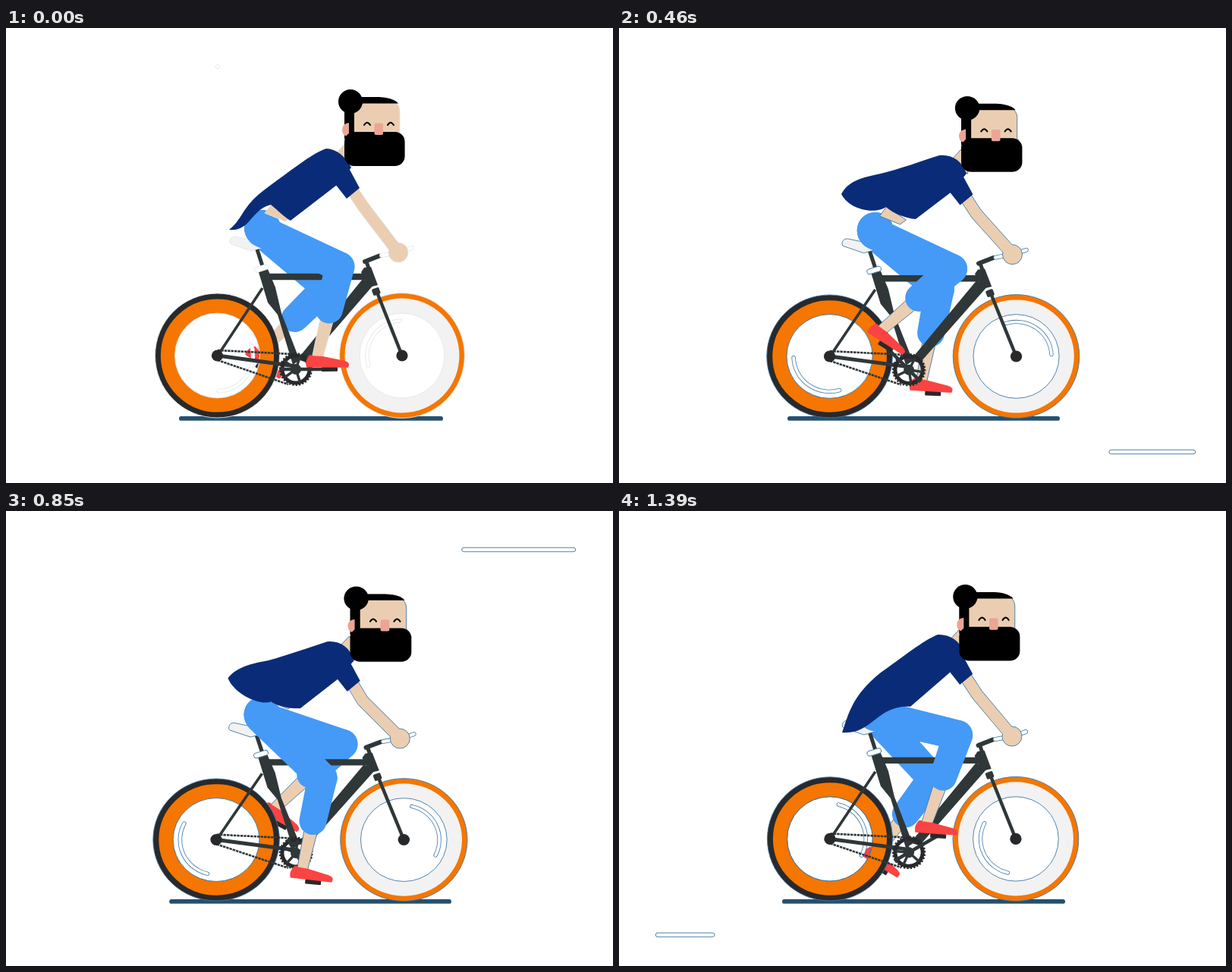
An HTML page that plays this animation: 800 by 600 pixels, repeating every 1.42 s.

```html
<!DOCTYPE html>
<html lang="en">
<head>
<meta charset="utf-8">
<title>Cyclist</title>
<style>
  html, body { margin: 0; width: 100%; height: 100%; overflow: hidden; background: #fff; }
  svg { display: block; width: 100vw; height: 100vh; --edge: #3f78a6; }
  .edge { stroke: var(--edge); stroke-width: .9; }
  .white { fill: #fff; }
  .pale { fill: #f2f2f2; }
  .orange { fill: #f57600; }
  .skin { fill: #ebceb1; }
  .pants { fill: #449af6; }
  .shoe { fill: #fa4343; }
  .shirt { fill: #0a2c78; }
  .dark { fill: #2f3739; }
  .tyre { fill: #28292b; }
  .pink { fill: #eba596; }
  .bar { fill: none; stroke: #2f3739; }
  .line { fill: none; stroke-linecap: round; stroke-linejoin: round; }
</style>
</head>
<body>
<svg viewBox="0 0 800 600">
  <defs>
    <g id="glint" class="line">
      <path d="M29-37A47 47 0 0 1 29 37" stroke="var(--edge)" stroke-width="5.4"/>
      <path d="M29-37A47 47 0 0 1 29 37" stroke="#fff" stroke-width="3.8"/>
    </g>
    <path id="sole" d="M-30-3Q-32-10-28-16Q-26-21-21-18L-8-17L20-11Q27-9 26-5L25-2Z"/>
    <rect id="pedal" x="-10" y="-3" width="21" height="6" rx="1"/>
    <circle id="hub" class="tyre" r="7.6"/>
  </defs>

  <rect id="dash" class="white edge" height="5.4" rx="2.7"/>
  <rect id="ground" y="512" height="5.8" rx="2.9" fill="#24506e"/>

  <g id="farLeg">
    <use href="#pedal" class="tyre"/>
    <path class="skin edge"/><path class="pants"/><path class="pants"/><circle class="pants" r="24"/>
    <use href="#sole" class="shoe"/>
  </g>

  <g id="bike">
    <g transform="translate(278.5 432)">
      <path class="tyre edge" fill-rule="evenodd" d="M-82 0a82 82 0 1 1 164 0a82 82 0 1 1-164 0ZM-56 0a56 56 0 1 0 112 0a56 56 0 1 0-112 0Z"/>
      <circle r="65.3" fill="none" stroke="#f57600" stroke-width="18.6"/>
      <circle id="rearDisc" class="edge" r="56"/>
      <use id="rearGlint" href="#glint"/>
    </g>
    <g transform="translate(522 432)">
      <circle class="orange edge" r="82.4"/>
      <circle class="pale" r="75.5"/>
      <circle class="white edge" r="56"/>
      <use id="frontGlint" href="#glint"/>
    </g>

    <path class="bar" d="M338 343L279 432" stroke-width="3.6"/>
    <path class="bar" d="M279 432L382 446" stroke-width="5"/>
    <path class="bar" d="M279 425L378 430M279 438L372 470" stroke-width="2.6" stroke-dasharray="3.4 1"/>
    <use href="#hub" x="278.5" y="432"/>
    <path class="bar" d="M488 346L522 432" stroke-width="4.4"/>
    <use href="#hub" x="522" y="432"/>
    <path class="bar" d="M345 328H482" stroke-width="8.4"/>
    <path class="dark" d="M333 322L345 318L355 342L363 376L387 438L378 444L358 378L345 362Z"/>
    <path class="dark" d="M470 331L485 338L396 441L384 437Z"/>
    <path class="dark" d="M468 322L472 316L481 315L490 339L478 342Z"/>
    <rect class="dark" x="-5" y="-5" width="10" height="9" rx="2" transform="translate(488 348) rotate(-20)"/>
    <path class="bar" d="M475 308L479 320" stroke-width="5"/>
    <path class="bar line" d="M473 308L492 300.5" stroke-width="6"/>
    <path class="line" d="M495 300L521 295L535 290" stroke="var(--edge)" stroke-width="6"/>
    <path class="line" d="M495 300L521 295L535 290" stroke="#fff" stroke-width="4.4"/>
    <path class="pale edge" d="M295 280Q296 275 302 275L339 283Q342 289 334 291L323 294L297 285Q294 284 295 280Z"/>
    <path class="bar" d="M331 292L339 317" stroke-width="5"/>
    <rect class="white edge" x="-9.5" y="-3.4" width="19" height="6.8" rx="3" transform="translate(336.5 317) rotate(-17)"/>
    <g transform="translate(382 450)">
      <g id="ring" class="bar">
        <circle r="18" stroke="#28292b" stroke-width="5"/>
        <circle r="21" stroke="#28292b" stroke-width="2" stroke-dasharray="2.4 2"/>
        <path d="M0 0L18 0M0 0L5.6 17.1M0 0L-14.6 10.6M0 0L-14.6-10.6M0 0L5.6-17.1" stroke-width="3.4"/>
      </g>
      <circle class="dark" r="7"/>
    </g>
  </g>

  <path id="crank" class="bar line" stroke-width="4.6"/>
  <g id="nearLeg">
    <use href="#pedal" class="tyre"/>
    <path class="skin edge"/><path class="pants"/><path class="pants"/><circle class="pants" r="24"/>
    <use href="#sole" class="shoe"/>
  </g>

  <path id="waist" class="skin edge" d="M341 244L350 232L376 249L368 255Z"/>
  <path id="neck" class="skin edge" d="M436 164L447 152L458 160L456 184Z"/>
  <path id="armEdge" class="line" stroke="var(--edge)" stroke-width="16.4"/>
  <circle id="hand" class="skin edge" r="13"/>
  <path id="arm" class="line" stroke="#ebceb1" stroke-width="15"/>
  <path id="shirt" class="shirt"/>
  <path id="sleeve" class="shirt" d="M430 178L452 185L466 211L449 225L434 206Z"/>

  <g id="head">
    <path class="skin edge" d="M455 97H512Q519 102 519 109V150H455Z"/>
    <circle cx="454" cy="97" r="16"/>
    <path d="M446 146V96Q446 91 452 91H492Q511 92 517 99.500H459V146Z"/>
    <path class="pink" d="M452 125V143Q443 143 443 134Q443 126 452 125Z"/>
    <rect x="446" y="137" width="79.6" height="45" rx="13"/>
    <rect class="pink" x="485.5" y="125.5" width="11.5" height="15.5" rx="2"/>
    <path class="line" d="M472 128Q476 121.500 480 128M503 128Q507 121.500 511 128" stroke="#000" stroke-width="2"/>
  </g>
</svg>
<script>
const $ = id => document.getElementById(id);
const svg = document.querySelector('svg');
const LOOP = 1420, RAD = Math.PI / 180;
const THIGH = 113, SHIN = 122, CRANK = 44;
const set = (el, attrs) => { for (const k in attrs) el.setAttribute(k, attrs[k]); };

// Shirt poses at 0, 90, 180 and 300 degrees of one bob.
const shirtPath = 'M# #C# # # # # #Q# # # #L# #L# #C# # # # # #C# # # # # #C# # # # # #Z';
const shirtPoses = [
  '345 210 370 192 405 164 422 159 442 160 455 184 436 207 375 254 366 249 358 240 349 233 322 240 322 269 294 266 314 250 310 235 345 210',
  '345 192 370 186 400 175 422 168 448 166 458 192 437 217 391 252 378 251 362 245 352 236 340 245 305 242 293 219 302 202 320 197 345 192',
  '345 219 375 201 405 184 426 176 448 176 459 203 437 226 372 279 362 281 352 283 342 282 322 281 305 262 292 251 310 244 325 231 345 219',
  '345 213 372 194 402 170 420 163 444 162 456 187 436 213 384 258 372 257 362 260 352 265 330 278 322 294 294 292 302 270 306 244 345 213'
].map(s => s.split(' ').map(Number));

// Smooth periodic curve through values at 0, 90, 180 and 300 degrees.
function wave(deg, p, q, r, s) {
  const c = (p + r) / 2, a = (p - r) / 2, b = q - c, x = deg * RAD;
  const rest = s - (c + a / 2 - b * Math.sqrt(3) / 2);
  const low = Math.max(0, -Math.sin(x));
  return c + a * Math.cos(x) + b * Math.sin(x) + rest * low * low / .75;
}

function capsule(a, ra, b, rb) {
  const dx = b.x - a.x, dy = b.y - a.y;
  const dir = Math.atan2(dy, dx), off = Math.acos((ra - rb) / Math.hypot(dx, dy));
  const at = (o, r, g) => (o.x + r * Math.cos(g)).toFixed(2) + ' ' + (o.y + r * Math.sin(g)).toFixed(2);
  return `M${at(a, ra, dir + off)}A${ra} ${ra} 0 1 1 ${at(a, ra, dir - off)}` +
    `L${at(b, rb, dir - off)}A${rb} ${rb} 0 0 1 ${at(b, rb, dir + off)}Z`;
}

const mix = (a, b, k) => ({ x: a.x + (b.x - a.x) * k, y: a.y + (b.y - a.y) * k });
const polar = (o, r, deg) => ({ x: o.x + r * Math.cos(deg * RAD), y: o.y + r * Math.sin(deg * RAD) });

function findKnee(hip, ankle) {
  const dx = ankle.x - hip.x, dy = ankle.y - hip.y, d = Math.hypot(dx, dy);
  const a = (THIGH ** 2 - SHIN ** 2 + d * d) / (2 * d);
  const h = Math.sqrt(Math.max(0, THIGH ** 2 - a * a));
  return { x: hip.x + (a * dx + h * dy) / d, y: hip.y + (a * dy - h * dx) / d };
}

function drawLeg(id, hip, axle, turn) {
  const pedal = polar(axle, CRANK, turn);
  const tilt = 17 - 18 * Math.cos((turn - 10) * RAD);
  const c = Math.cos(tilt * RAD), s = Math.sin(tilt * RAD);
  const ankle = { x: pedal.x - 15 * c + 17 * s, y: pedal.y - 15 * s - 17 * c };
  const knee = findKnee(hip, ankle);
  const [block, skin, thigh, calf, seat, shoe] = $(id).children;
  const place = `translate(${pedal.x} ${pedal.y}) rotate(${tilt})`;
  set(block, { transform: place });
  set(shoe, { transform: place });
  set(skin, { d: capsule(mix(knee, ankle, .4), 9.5, ankle, 7) });
  set(thigh, { d: capsule(hip, 21, knee, 19.5) });
  set(calf, { d: capsule(knee, 19.5, mix(knee, ankle, .48), 18) });
  set(seat, { cx: hip.x + 1, cy: hip.y - 4 });
  return pedal;
}

function drawDash(phase) {
  const n = Math.floor(phase / 360), s = phase - n * 360, len = 217;
  const start = [279, 757, 748, 268][n % 4];
  const lead = Math.min(1, s / 180) * len, tail = Math.max(0, s / 180 - 1) * len;
  set($('dash'), { x: start - lead - 2.7, y: (n % 2 ? 559 : 51) - 2.7, width: lead - tail + 5.4 });
}

// Clock in even steps of the pedalling cycle.
function stepTime(t) {
  if (t < 30) return 10;
  if (t < 190) return 40 + Math.floor((t - 30) / 40) * 37.5;
  return 190 + Math.floor((t - 190) / 30) * 30;
}

function draw(t) {
  const first = t < 30, open = first || t >= 1390;
  const phase = stepTime(t) - 10, bob = phase % 360;
  const w = (...v) => wave(bob, ...v);
  const sx = w(1, 1.01, 1.021, 1.006), sy = w(1, .988, .974, .995);
  const squash = (x, y) => ({ x: 370 + (x - 370) * sx, y: 515 + (y - 515) * sy });

  svg.style.setProperty('--edge', first ? '#e3e6e9' : '#3f78a6');
  set($('rearDisc'), { fill: open ? 'none' : '#fff' });

  drawDash(phase);
  const left = w(228, 222, 204, 215);
  set($('ground'), { x: left, width: w(576, 581, 597, 588) - left });

  set($('bike'), { transform: `translate(370 515) scale(${sx} ${sy}) translate(-370 -515)` });
  set($('rearGlint'), { transform: `rotate(${phase + 36})` });
  set($('frontGlint'), { transform: `rotate(${phase + 215}) scale(.98)` });

  const turn = phase / 2, hip = squash(337, 268), axle = squash(382, 450);
  set($('ring'), { transform: `rotate(${turn})` });
  const far = drawLeg('farLeg', hip, axle, turn + 180);
  const near = drawLeg('nearLeg', hip, axle, turn);
  const stub = mix(axle, far, .45);
  set($('crank'), { d: `M${stub.x} ${stub.y}L${axle.x} ${axle.y}L${near.x} ${near.y}` });

  const lift = w(0, 8.5, 18, 4), dx = w(0, 5, 10, 2.3);
  set($('waist'), { transform: `translate(${dx * .5} ${w(0, 4, 8, 2)})` });
  set($('neck'), { transform: `translate(${dx * .7} ${lift})` });
  set($('sleeve'), { transform: `translate(${dx * .1} ${lift})` });
  set($('head'), {
    transform: `translate(${446 + dx} ${137 + w(0, 8.3, 32.6, 15.8)}) scale(${sx} ${sy}) translate(-446 -137)`
  });

  const hand = squash(517, 296);
  const arm = `M455 ${212 + lift}L${w(472, 471, 469, 472)} ${w(237, 245, 257, 242)}L${hand.x - 3} ${hand.y - 4}`;
  set($('arm'), { d: arm });
  set($('armEdge'), { d: arm });
  set($('hand'), { cx: hand.x, cy: hand.y });

  let i = 0;
  const next = () => {
    const values = shirtPoses.map(p => p[i]);
    i++;
    return w(...values).toFixed(2);
  };
  set($('shirt'), { d: shirtPath.replace(/#/g, next) });
}

const begin = performance.now();
function frame() {
  draw((performance.now() - begin) % LOOP);
  requestAnimationFrame(frame);
}
frame();
</script>
</body>
</html>
```
